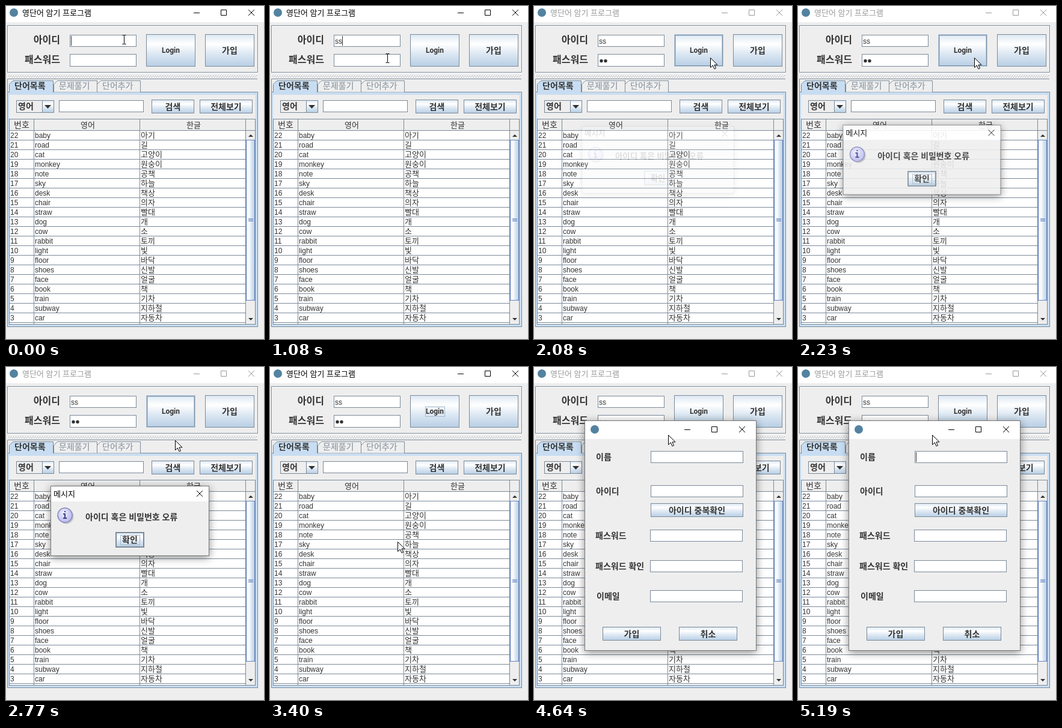
An HTML page for the animation above (5.42 s loop, 429x555 px).

```html
<!DOCTYPE html>
<html lang="ko">
<meta charset="utf-8">
<title>영단어 암기 프로그램</title>
<style>
  html, body { margin: 0; width: 100%; height: 100%; overflow: hidden; background: #eee; }
  svg { display: block; }
  text { font-family: "Liberation Sans", "Noto Sans CJK KR", "Noto Sans CJK JP", sans-serif; fill: #333; white-space: pre; }
  #login text { font-family: Roboto, sans-serif; }
  .bar { color: #000; }
  .bar text { fill: currentColor; }
  .bar path { stroke: currentColor; fill: none; }
  .idle { color: #999; }
  .ring, .focus { fill: none; visibility: hidden; }
  .over .ring, .focused .focus { visibility: visible; }
  .down .ring { visibility: hidden; }
  .down .face { fill: #b8cfe5; }
  .window { filter: drop-shadow(0 3px 7px rgba(0, 0, 0, .45)); }
</style>
<svg id="stage" width="429" height="555" viewBox="0 0 429 555"></svg>
<script>
const EDGE = '#7a8a99', LIGHT = '#b8cfe5', LOOP = 5420;

const rect = (x, y, w, h, fill, extra = '') =>
  `<rect x="${x}" y="${y}" width="${w}" height="${h}" fill="${fill}" ${extra}/>`;
const box = (x, y, w, h, fill = '#fff', stroke = EDGE, cls = '') =>
  rect(x + .5, y + .5, w - 1, h - 1, fill, `stroke="${stroke}" class="${cls}"`);
const path = (d, fill = 'none', stroke = EDGE) => `<path d="${d}" fill="${fill}" stroke="${stroke}"/>`;
// Text is placed by the middle of its height
const text = (x, y, s, size = 14, extra = '') =>
  `<text x="${x}" y="${y + size * .37}" font-size="${size}" ${extra}>${s}</text>`;
const bold = (x, y, s, size = 14, extra = '') => text(x, y, s, size, 'font-weight="700" ' + extra);
const MID = 'text-anchor="middle"';
const group = (id, body, extra = '') => `<g id="${id}" ${extra}>${body}</g>`;

function button(id, x, y, w, h, label, size = 14) {
  const cx = x + w / 2, cy = y + h / 2;
  const ring = (i, color) => box(x + i, y + i, w - 2 * i, h - 2 * i, 'none', color, 'ring');
  return group(id,
    box(x, y, w, h, 'url(#ocean)', EDGE, 'face') +
    ring(0, LIGHT) + ring(1, EDGE) + ring(2, LIGHT) +
    bold(cx, cy, label, size, MID) +
    box(Math.round(cx) - 16, Math.round(cy) - 8, 33, 17, 'none', '#a3b8cc', 'focus'));
}

const cross = (x, y) => `M${x - 5} ${y - 5}l10 10m0 -10l-10 10`;
const controls = (x, y) =>
  path(`M${x - 5} ${y + .5}h10M${x + 40.5} ${y - 4.5}h9v9h-9z${cross(x + 91, y)}`, 'none', '');
const icon = (x, y) => `<circle cx="${x}" cy="${y}" r="7" fill="#5382a1"/>`;

const oceanStops = `<stop stop-color="#dde8f3"/><stop offset=".3" stop-color="#fff"/>
  <stop offset=".6" stop-color="#dde8f3"/><stop offset="1" stop-color="${LIGHT}"/>`;
const defs = `<defs>
  <linearGradient id="ocean" x2="0" y2="1">${oceanStops}</linearGradient>
  <linearGradient id="thumb">${oceanStops}</linearGradient>
  <radialGradient id="orb" cx=".4" cy=".35"><stop stop-color="#eeeeff"/><stop offset="1" stop-color="#c4c4f6"/></radialGradient>
  <pattern id="bumps" width="4" height="4" patternUnits="userSpaceOnUse" x="3" y="115">
    ${rect(0, 0, 1, 1, '#fff') + rect(1, 1, 1, 1, EDGE) + rect(2, 2, 1, 1, '#fff') + rect(3, 3, 1, 1, EDGE)}
  </pattern></defs>`;

function loginPanel() {
  return box(3, 33, 417, 79, 'none', '#fff') + box(2, 32, 417, 79, 'none') +
    bold(90, 56.3, '아이디', 16, 'text-anchor="end"') +
    bold(90, 89.3, '패스워드', 16, 'text-anchor="end"') +
    box(106, 48, 111, 20) + box(106, 80, 111, 21) +
    text(108, 59, '', 12, 'id="user"') +
    [0, 1].map(i => `<circle id="dot${i}" cx="${112 + 7 * i}" cy="91.5" r="2.7" fill="#333"/>`).join('') +
    rect(0, 0, 1, 16, '#333', 'id="caret"') +
    button('login', 233, 47, 82, 54, 'Login', 12) +
    button('join', 331, 47, 82, 54, '가입') +
    rect(3, 115, 415, 5, 'url(#bumps)');
}

function tabs() {
  const tab = (x, w, label, on) =>
    path(`M${x + .5} 143.5v-13l6 -6h${w - 6}v19`, on ? '#c8ddf2' : '#eee') +
    (on ? '' : bold(x + 10, 133.5, label, 14, 'style="fill:#fff"')) +
    bold(x + 9, 132.5, label, 14, on ? '' : 'style="fill:#a0a8b0"');
  return path('M2.5 534V121.5H418') + rect(2, 143, 417, 391, '#c8ddf2') + box(2, 143, 417, 392, 'none') +
    rect(5, 148, 410, 383, '#eee') +
    tab(79, 72, '문제풀기') + tab(151, 72, '단어추가') + tab(5, 73, '단어목록', true) +
    rect(6, 143, 72, 1, '#c8ddf2') +
    box(17, 157, 63, 21, '#eee') + box(60, 157, 20, 21, 'url(#ocean)') + bold(20, 167, '영어') +
    path('M64 165h11l-5.5 6z', '#333', 'none') +
    box(88, 157, 141, 20) +
    button('find', 242, 156, 71, 23, '검색') + button('all', 322, 156, 88, 23, '전체보기');
}

function table() {
  const words = `baby 아기,road 길,cat 고양이,monkey 원숭이,note 공책,sky 하늘,desk 책상,chair 의자,straw 빨대,dog 개,
cow 소,rabbit 토끼,light 빛,floor 바닥,shoes 신발,face 얼굴,book 책,train 기차,subway 지하철,car 자동차`.split(',');
  const rows = words.map((pair, i) => {
    const y = 215 + 16 * i, [en, ko] = pair.trim().split(' ');
    return text(7, y + .5, 22 - i, 12) + text(48, y + .5, en, 12) + text(224, y, ko, 13) + path(`M6 ${y + 8.5}h393`);
  }).join('');
  const arrow = (y, d) => path(`M403 ${y + 8 - 2 * d}h8l-4 ${4 * d}z`, '#333', 'none');
  return box(5, 188, 410, 343) + rect(6, 189, 408, 18, '#eee') + path('M6 207.5h408') +
    text(26, 198, '번호', 14, MID) + text(136, 198, '영어', 13, MID) + text(312, 198, '한글', 13, MID) +
    rows + path('M46.5 188v342M222.5 188v342M398.5 188v342') +
    rect(399, 208, 15, 322, '#eee') + arrow(208, -1) + arrow(514, 1) +
    box(399, 223, 15, 268, 'url(#thumb)', '#6382bf') +
    path('M403 354.5h8m-8 2h8m-8 2h8', 'none', '#6382bf');
}

function messageBox() {
  return box(74, 198, 264, 117, '#eee', '#777') + rect(75, 199, 262, 25, '#fff') +
    group('', text(79, 211, '메시지', 13) + path(cross(322, 211), 'none', ''), 'class="bar"') +
    '<circle cx="100" cy="249" r="12.5" fill="#c4c4c8"/>' +
    '<circle cx="98" cy="247" r="12" fill="url(#orb)" stroke="#8585b5" stroke-width="1.5"/>' +
    rect(97, 240, 2, 2, '#40407c') + path('M95 244h4v7h2v2h-6v-2h2v-5h-2z', '#40407c', 'none') +
    bold(132, 250, '아이디 혹은 비밀번호 오류') +
    group('okWrap', button('ok', 182, 275, 48, 26, '확인') + box(183, 276, 46, 24, 'none'), 'class="focused"');
}

function signUp() {
  const field = (label, lx, x, y) => bold(lx, y + 10, label) + box(x, y, 154, 20);
  return box(84, 89, 286, 384, '#eee', '#777') + rect(85, 90, 284, 30, '#fff') +
    icon(101, 104) + group('', controls(255, 104), 'class="bar"') +
    field('이름', 103, 194, 140) + field('아이디', 103, 194, 197) +
    button('check', 194, 227, 154, 23, '아이디 중복확인') +
    field('패스워드', 102, 193, 271) + field('패스워드 확인', 102, 193, 322) + field('이메일', 104, 193, 372) +
    button('submit', 114, 433, 97, 23, '가입') + button('cancel', 241, 433, 97, 23, '취소') +
    rect(196, 142, 1, 16, '#333', 'id="nameCaret"');
}

const stage = document.getElementById('stage');
stage.innerHTML = defs + rect(0, 0, 429, 555, '#eee') + rect(0, 0, 429, 27, '#fff') + icon(13, 11) +
  group('bar', text(27, 11, '영단어 암기 프로그램', 13) + controls(317, 11), 'class="bar"') +
  loginPanel() + tabs() + table() +
  group('message', messageBox(), 'class="window"') +
  group('signup', signUp(), 'class="window"') +
  group('beam', path('M-3 -7.5h2.5l.5 .5l.5 -.5h2.5M0 -7v14M-3 7.5h2.5l.5 -.5l.5 .5h2.5', 'none', '#000')) +
  group('arrow', path('M.5 .5v16l3.8 -3.6l2.7 6l2.5 -1.1l-2.6 -5.8h5.2z', '#fff', '#000'));

// Each step changes some of the state and holds until the next
const steps = [
  [0, { at: [196.5, 56], beam: 1, user: '', dots: 0, caret: [108, 50], login: '', join: '', ok: '', idle: 0, message: 0, scale: 1, signup: 0, nameCaret: 0 }],
  [530, { caret: null }],
  [760, { user: 's', caret: [114, 50] }],
  [930, { user: 'ss', caret: [120, 50] }],
  [1000, { at: [197, 70] }],
  [1080, { at: [195.5, 87] }],
  [1200, { at: [197, 91], caret: [108, 83] }],
  [1250, { at: [200, 93] }],
  [1310, { dots: 1, caret: [116, 83] }],
  [1450, { dots: 2, caret: [123, 83], at: [212, 92] }],
  [1540, { beam: 0, at: [262, 89], login: 'over' }],
  [1620, { at: [293, 86] }],
  [1850, { login: 'over down', caret: null }],
  [1930, { login: 'over' }],
  [2000, { idle: 1 }],
  [2080, { message: .15, scale: .96 }],
  [2160, { message: .6, scale: .985 }],
  [2230, { message: .88, scale: .996 }],
  [2310, { message: 1, scale: 1 }],
  [2390, { at: [286, 101] }],
  [2460, { at: [284, 110] }],
  [2540, { at: [283, 116] }],
  [2770, { at: [281, 122] }],
  [2850, { at: [258, 215] }],
  [2920, { at: [212, 283], ok: 'over' }],
  [3090, { ok: 'over down' }],
  [3170, { ok: 'over', message: .75, scale: .98, idle: 0, login: 'focused' }],
  [3250, { message: .25, scale: .94 }],
  [3320, { message: 0, ok: '' }],
  [3400, { at: [212, 291] }],
  [3550, { at: [226, 255] }],
  [3630, { at: [262, 195] }],
  [3700, { at: [302, 143] }],
  [3780, { at: [338, 108] }],
  [3860, { at: [362, 91], join: 'over' }],
  [3940, { at: [371, 85] }],
  [4260, { login: '', join: 'over down' }],
  [4410, { join: 'over', idle: 1 }],
  [4640, { at: [223, 113], join: '', signup: 1 }],
  [5190, { nameCaret: 1 }],
];

const el = id => document.getElementById(id);
const move = (id, [x, y]) => el(id).setAttribute('transform', `translate(${x} ${y})`);
const show = (id, on) => el(id).style.display = on ? '' : 'none';

function draw(t) {
  const s = Object.assign({}, ...steps.filter(([start]) => t >= start).map(([, change]) => change));
  el('bar').setAttribute('class', s.idle ? 'bar idle' : 'bar');
  for (const id of ['login', 'join', 'ok']) el(id).setAttribute('class', s[id]);
  el('user').textContent = s.user;
  for (const i of [0, 1]) show('dot' + i, s.dots > i);
  show('caret', s.caret);
  if (s.caret) move('caret', s.caret);
  show('message', s.message);
  el('message').style.opacity = s.message;
  el('message').setAttribute('transform', `translate(206 256) scale(${s.scale}) translate(-206 -256)`);
  show('signup', s.signup);
  show('nameCaret', s.nameCaret);
  show('beam', s.beam);
  show('arrow', !s.beam);
  move(s.beam ? 'beam' : 'arrow', s.at);
}

const begin = performance.now();
function tick() {
  draw((performance.now() - begin) % LOOP);
  requestAnimationFrame(tick);
}
tick();
</script>
</html>
```
